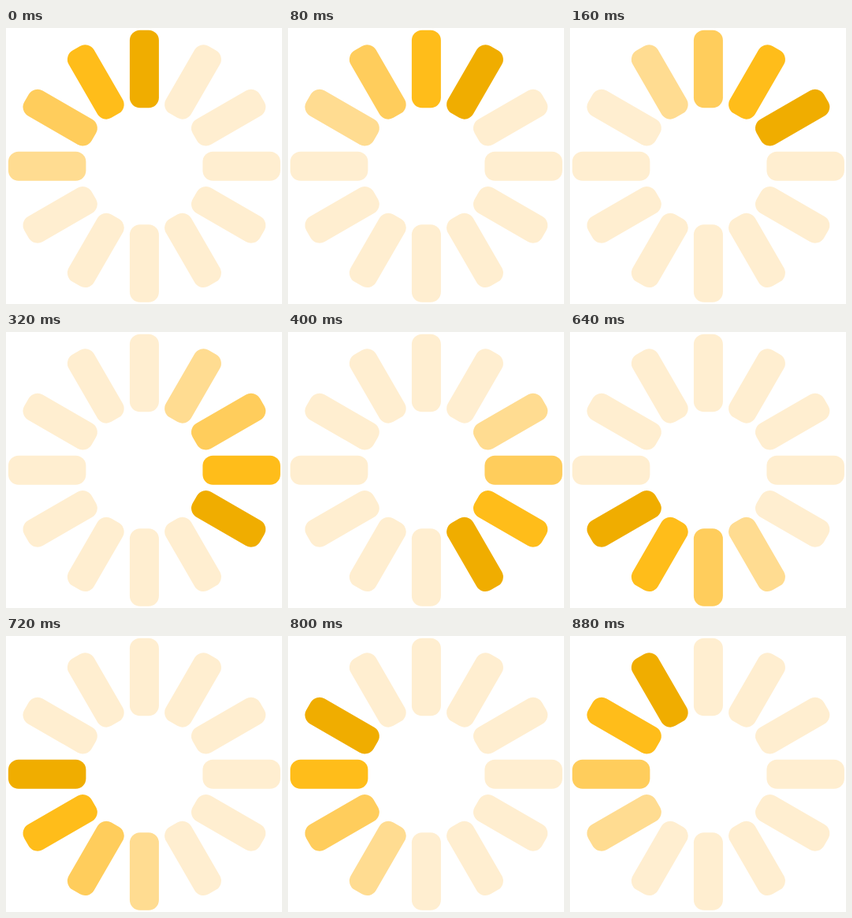
Write an HTML page that moves like this. It is 350 px wide and 350 px high and loops after 960 ms.

```html
<!DOCTYPE html>
<html lang="en">
<head>
<meta charset="utf-8">
<title>Spinner</title>
<style>
  html, body { margin: 0; width: 100%; height: 100%; overflow: hidden; background: #fff; }
  svg { display: block; width: 100vw; height: 100vh; }
</style>
</head>
<body>
<svg viewBox="0 0 350 350"><g id="spinner" transform="translate(175.4 175.2)"></g></svg>
<script>
  const BARS = 12, STEP_MS = 80;
  const TRAIL = ['#f0ad00', '#ffbd1a', '#ffcd5c', '#ffdc91'];
  const IDLE = '#ffeed0';

  const spinner = document.getElementById('spinner');
  const bars = Array.from({ length: BARS }, (_, i) => {
    const bar = document.createElementNS('http://www.w3.org/2000/svg', 'rect');
    const attrs = { x: -18.5, y: -172.5, width: 37, height: 98.5, rx: 13, transform: `rotate(${i * 360 / BARS})` };
    for (const name in attrs) bar.setAttribute(name, attrs[name]);
    return spinner.appendChild(bar);
  });

  function draw(time) {
    const head = Math.floor(time / STEP_MS) % BARS;
    bars.forEach((bar, i) => {
      const age = (head - i + BARS) % BARS;
      bar.setAttribute('fill', TRAIL[age] || IDLE);
    });
  }

  const start = performance.now();
  function tick() {
    draw(performance.now() - start);
    requestAnimationFrame(tick);
  }
  tick();
</script>
</body>
</html>
```
